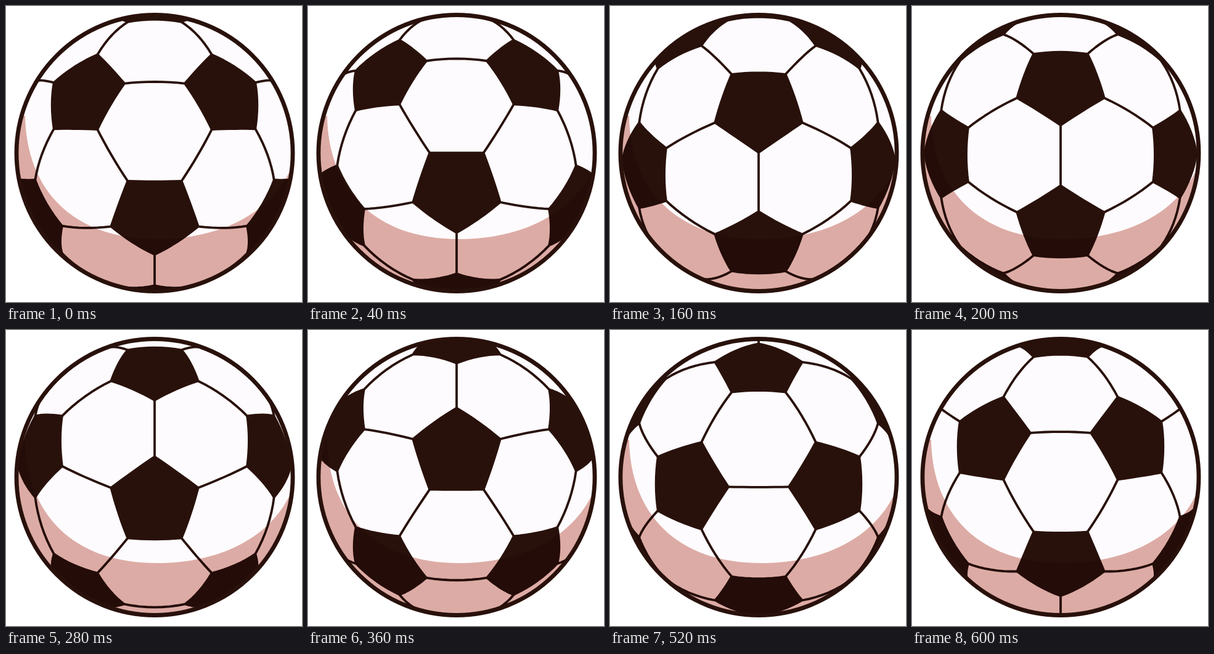
Write an HTML page with a canvas that moves like this. It is 480 by 480 pixels and loops after 640 ms.

```html
<!DOCTYPE html>
<html lang="en">
<head>
<meta charset="utf-8">
<title>Rolling football</title>
<style>
  html, body { margin: 0; width: 100%; height: 100%; overflow: hidden; background: #fff; }
  canvas { display: block; }
</style>
</head>
<body>
<canvas id="stage" width="480" height="480"></canvas>
<script>
const ctx = document.getElementById('stage').getContext('2d');
const CX = 241, CY = 238.5, R = 226;
const INK = '#29110b', LEATHER = '#fdfbfd', SHADE = '#dfaea6';
const STEP = 40, STEPS = 16, GOLD = (1 + Math.sqrt(5)) / 2, RAD = Math.PI / 180;
const CUT = 0.322; // share of each icosahedron edge inside a black patch

const dot = (a, b) => a[0] * b[0] + a[1] * b[1] + a[2] * b[2];
const cross = (a, b) => [
  a[1] * b[2] - a[2] * b[1],
  a[2] * b[0] - a[0] * b[2],
  a[0] * b[1] - a[1] * b[0]
];
const lerp = (a, b, t) => a.map((v, i) => v + (b[i] - v) * t);

// Icosahedron corners are the centres of the black patches
const corners = [];
for (const s of [-1, 1]) {
  for (const g of [-GOLD, GOLD]) corners.push([0, s, g], [s, g, 0], [g, 0, s]);
}

const patches = [], seams = [];
corners.forEach((v, i) => {
  const near = corners.filter(w => Math.abs(dot(v, w) - GOLD) < 0.01);
  const e = cross(v, near[0]);
  const f = cross(e, v).map(n => n / Math.sqrt(dot(v, v)));
  const turn = w => Math.atan2(dot(e, w), dot(f, w));
  near.sort((a, b) => turn(a) - turn(b));
  const ring = near.map(w => lerp(v, w, CUT));
  patches.push(ring.flatMap((p, n) => arc(p, ring[(n + 1) % 5])));
  for (const w of near) {
    if (corners.indexOf(w) > i) seams.push(arc(lerp(v, w, CUT), lerp(w, v, CUT)));
  }
});

// Points along the great circle between two directions
function arc(a, b) {
  return Array.from({ length: 9 }, (_, i) => {
    const p = lerp(a, b, i / 8), len = Math.sqrt(dot(p, p));
    return p.map(n => n / len);
  });
}

function trace(points, c, s) {
  let seen = false;
  ctx.beginPath();
  for (const [x, y0, z0] of points) {
    const y = y0 * c + z0 * s, z = z0 * c - y0 * s;
    // Points behind the ball slide to its rim
    const k = z < 0 ? R / Math.hypot(x, y) : R;
    if (z >= 0) seen = true;
    ctx.lineTo(CX + x * k, CY + y * k);
  }
  return seen;
}

function disc(r) {
  ctx.beginPath();
  ctx.arc(CX, CY, r, 0, Math.PI * 2);
}

function drawShade() {
  ctx.globalCompositeOperation = 'multiply';
  ctx.fillStyle = SHADE;
  ctx.beginPath();
  ctx.moveTo(31, 178);
  ctx.bezierCurveTo(33, 298, 108, 378, 245, 378);
  ctx.bezierCurveTo(348, 378, 428, 336, 461, 266);
  ctx.lineTo(480, 266);
  ctx.lineTo(480, 480);
  ctx.lineTo(0, 480);
  ctx.lineTo(0, 178);
  ctx.fill();
}

function draw(step) {
  const sway = 1.6 * Math.sin((step - 0.7) / STEPS * Math.PI * 2);
  const angle = (58.8 - sway - step * 180 / STEPS) * RAD;
  const c = Math.cos(angle), s = Math.sin(angle);

  ctx.clearRect(0, 0, 480, 480);
  ctx.save();
  disc(224);
  ctx.fillStyle = LEATHER;
  ctx.fill();
  ctx.clip();

  ctx.strokeStyle = ctx.fillStyle = INK;
  ctx.lineJoin = ctx.lineCap = 'round';
  ctx.lineWidth = 3.8;
  for (const seam of seams) {
    if (trace(seam, c, s)) ctx.stroke();
  }
  ctx.lineWidth = 3;
  for (const patch of patches) {
    if (!trace(patch, c, s)) continue;
    ctx.closePath();
    ctx.fill();
    ctx.stroke();
  }
  drawShade();
  ctx.restore();

  disc(224);
  ctx.strokeStyle = INK;
  ctx.lineWidth = 6.8;
  ctx.stroke();
}

function tick() {
  draw(Math.floor(performance.now() / STEP) % STEPS);
  requestAnimationFrame(tick);
}
tick();
</script>
</body>
</html>
```
